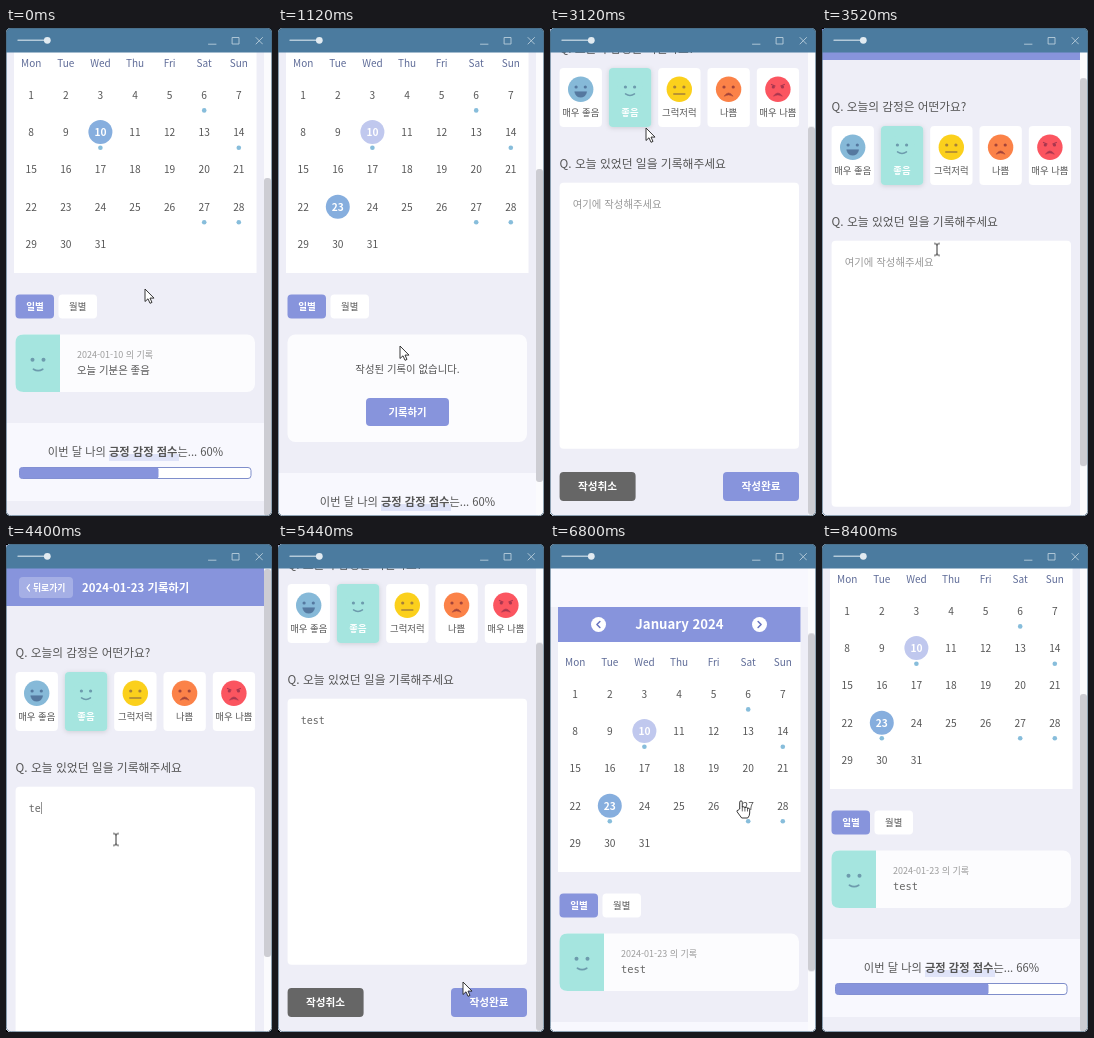
An HTML page that plays this animation: 266 px wide and 488 px high, repeating every 8800 ms.

```html
<!DOCTYPE html>
<html lang="ko">
<head>
<meta charset="utf-8">
<title>Mood diary</title>
<style>
html, body { margin: 0; width: 100%; height: 100%; overflow: hidden; background: #101820; }
svg { display: block; width: 266px; height: 488px; }
text { font-family: "Noto Sans CJK KR", "Noto Sans CJK", sans-serif; fill: #555; white-space: pre; }
.mid { text-anchor: middle; }
.medium { font-weight: 500; }
.bold { font-weight: 700; }
.white { fill: #fff; }
.mono { font-family: "DejaVu Sans Mono", monospace; fill: #666; }
.accent { fill: #8794dc; }
.light { fill: #f8f8fe; }
.soft { fill: #fcfcfe; }
.thumb { fill: #cdcdd3; }
.line { fill: none; stroke-linecap: round; stroke-linejoin: round; }
.pick { filter: drop-shadow(0 1px 2.5px #0002); }
</style>
</head>
<body>
<svg id="stage" viewBox="0 0 266 488"></svg>
<script>
const LOOP = 8800, A_MAX = 171;
let css = '';

// Each step is [ms, value]; values hold until the next step.
function track(id, prop, steps) {
  const frames = steps.map(([ms, v]) => `${ms / LOOP * 100}%{${prop}:${v}}`).join('');
  css += `@keyframes ${id}{${frames}}#${id}{animation:${id} ${LOOP}ms step-end infinite}`;
}
const move = (id, steps) =>
  track(id, 'transform', steps.map(([ms, x, y]) => [ms, `translate(${x}px,${y}px)`]));
const show = (id, from, to = LOOP) => track(id, 'opacity', [
  ...(from ? [[0, 0]] : []), [from, 1], ...(to < LOOP ? [[to, 0]] : [])]);

const rect = (x, y, w, h, r, attrs) =>
  `<rect x="${x}" y="${y}" width="${w}" height="${h}" rx="${r}" ${attrs}/>`;
const dot = (x, y, r, attrs = '') => `<circle cx="${x}" cy="${y}" r="${r}" ${attrs}/>`;
const text = (x, y, size, str, cls = '', attrs = '') =>
  `<text x="${x}" y="${y}" font-size="${size}" class="${cls}" ${attrs}>${str}</text>`;
const path = (d, attrs) => `<path d="${d}" ${attrs}/>`;
const group = (id, body) => `<g id="${id}">${body}</g>`;

// Calendar page, laid out as seen when scrolled to its end
const dayPos = d => [25.2 + (d - 1) % 7 * 34.6, 66.8 + Math.floor((d - 1) / 7) * 37.3];
const dayText = (d, cls) => {
  const [x, y] = dayPos(d);
  return text(x, y + 3.9, 10.2, d, 'mid ' + cls);
};
const mark = d => {
  const [x, y] = dayPos(d);
  return dot(x, y + 15.6, 2.3, 'fill="#87bddb"');
};
const disc = (d, id) => {
  const [x, y] = dayPos(d);
  return dot(x, y, 12, `id="${id}" fill="#86aede"`);
};

function calendar() {
  const days = Array.from({ length: 31 }, (_, i) => dayText(i + 1, '')).join('');
  const names = ['Mon', 'Tue', 'Wed', 'Thu', 'Fri', 'Sat', 'Sun'].map((n, i) =>
    text(25.2 + i * 34.6, 39.3, 10, n, 'mid medium', 'style="fill:#5f6c98"')).join('');
  const arrow = (x, dir) => dot(x, -2.5, 7.5, 'fill="#fff"') +
    path(`M${x - dir * 1.4} -5.5l${dir * 3} 3l${-dir * 3} 3`, 'class="line" stroke="#6874c0" stroke-width="1.5"');
  return rect(0, -150, 258, 130, 0, 'class="light"') +
    rect(8, -20, 242.5, 265, 0, 'fill="#fff"') + rect(8, -20, 242.5, 35, 0, 'class="accent"') +
    arrow(48.5, -1) + arrow(209.5, 1) + text(129.5, 1.7, 13.2, 'January 2024', 'mid white bold') +
    names + days + disc(10, 'today') + dayText(10, 'white bold') +
    group('chosen', disc(23, 'd23') + dayText(23, 'white bold')) +
    [6, 10, 14, 27, 28].map(mark).join('') + group('newMark', mark(23));
}

const record = (id, date, body) => group(id,
  rect(9.5, 306.5, 239.5, 57.5, 8, 'class="soft"') +
  path('M54 306.5H17.5q-8 0-8 8V356q0 8 8 8H54z', 'fill="#a5e5df"') +
  `<g fill="#6d9bad">${dot(26.5, 331.7, 2)}${dot(37.5, 331.7, 2)}</g>` +
  path('M27.5 341.2q4.6 3 9.2 0', 'class="line" stroke="#6d9bad" stroke-width="1.8"') +
  text(71, 330.3, 9, date + ' 의 기록', '', 'style="fill:#9c9c9c"') + body);

const empty = () => group('empty',
  rect(9.5, 306.5, 239.5, 107.5, 8, 'class="soft"') +
  text(129.5, 345, 10.4, '작성된 기록이 없습니다.', 'mid') +
  rect(88, 370, 83, 28, 4, 'class="accent"') + text(129.5, 388, 10.4, '기록하기', 'mid bold white'));

const summary = () => {
  const label = (id, pct) => group(id, text(129.5, 427.7, 11.25,
    `이번 달 나의 <tspan class="bold">긍정 감정 점수</tspan>는... ${pct}%`, 'mid'));
  return group('summary', rect(0, 395, 258, 78, 0, 'class="light"') +
    rect(103, 426, 70, 7, 0, 'fill="#dfe3f8"') + label('before', 60) + label('after', 66) +
    rect(13.5, 439.5, 231.5, 11, 3, 'fill="#fff" stroke="#7f8ecb"') +
    rect(13.5, 439.5, 139, 11, 2, 'id="bar" class="accent"'));
};

const tabs = () => rect(9.5, 266.5, 38.5, 24, 4, 'class="accent"') + text(29, 282.1, 9.6, '일별', 'mid bold white') +
  rect(52.5, 266.5, 38.5, 24, 4, 'fill="#fff"') + text(71.7, 282.1, 9.4, '월별', 'mid');

const pageA = () => group('pageA', rect(0, -150, 258, 700, 0, 'fill="#eeeef7"') + calendar() + tabs() +
  record('rec10', '2024-01-10', text(71, 346, 10.4, '오늘 기분은 좋음')) +
  record('rec23', '2024-01-23', text(71, 345.7, 10.4, 'test', 'mono')) + empty() + summary());

// Writing page, laid out unscrolled: label, skin, ink, mouth, filled mouth
const moods = [
  ['매우 좋음', '#86b9d8', '#55789f', 'M-6 2.5H6Q5 8 0 8T-6 2.5z', true],
  ['좋음', '#a5e5df', '#6d9bad', 'M-4.5 4.7q4.5 3.2 9 0'],
  ['그럭저럭', '#fbd01c', '#a5803a', 'M-5.5 4.8h11'],
  ['나쁨', '#fb8248', '#a3443a', 'M-4.5 7q4.5-6.6 9 0-4.5-2.6-9 0z', true],
  ['매우 나쁨', '#fb5560', '#a8374f', 'M-4.5 7q4.5-6.6 9 0-4.5-2.6-9 0z', true]
];
function moodCard(i, picked) {
  const [label, skin, ink, mouth, solid] = moods[i], x = 9.6 + i * 49.3, mid = x + 21.1;
  const brows = i === 4 ? path('M-6.5-4.8l3.6 1.6M6.5-4.8l-3.6 1.6', 'class="line" stroke-width="1.1"') : '';
  return rect(x, 128, 42.3, 59, 4, `fill="${picked ? skin : '#fff'}" ${picked ? 'class="pick"' : ''}`) +
    `<g transform="translate(${mid} 149.2)">${dot(0, 0, 12.7, `fill="${skin}"`)}<g fill="${ink}" stroke="${ink}">` +
    dot(-4.6, -2.2, 1.6, 'stroke="none"') + dot(4.6, -2.2, 1.6, 'stroke="none"') + brows +
    path(mouth, solid ? 'stroke-width=".5"' : 'class="line" stroke-width="1.5"') + '</g></g>' +
    text(mid, 176, 9.4, label, 'mid' + (picked ? ' bold white' : ''));
}
const caret = x => rect(x, 258, .7, 12, 0, 'fill="#666"');
const typed = (id, str, end) => group(id, text(22.7, 267.7, 10, str, 'mono') + (end ? caret(end) : ''));
const button = (x, cls, label) => rect(x, 532, 76, 29, 4, cls) + text(x + 38, 550.3, 10.6, label, 'mid bold white');

const pageB = () => group('pageB', rect(0, 0, 258, 620, 0, 'fill="#eeeef7"') +
  rect(0, 20, 258, 42, 0, 'class="accent"') + rect(13, 33, 54, 21, 4, 'fill="#fff" fill-opacity=".25"') +
  path('M23.5 40.7l-2.5 3.2 2.5 3.2', 'class="line" stroke="#fff" stroke-width="1.1"') +
  text(27, 46.8, 8.8, '뒤로가기', 'bold white') + text(76, 48, 11.4, '2024-01-23 기록하기', 'bold white') +
  text(9.6, 113, 11.7, 'Q. 오늘의 감정은 어떤가요?') + moods.map((_, i) => moodCard(i)).join('') +
  group('soso', moodCard(2, true)) + group('good', moodCard(1, true)) +
  text(9.6, 228, 11.8, 'Q. 오늘 있었던 일을 기록해주세요') + rect(9.6, 242.8, 239.4, 266, 4, 'fill="#fff"') +
  group('hint', text(22.7, 268, 10.4, '여기에 작성해주세요', '', 'style="fill:#999"')) +
  group('focus', caret(23)) + typed('typed2', 'te', 35.3) + typed('typed3', 'tes', 41.3) + typed('typed4', 'test') +
  button(9.6, 'fill="#666"', '작성취소') + button(173, 'class="accent"', '작성완료'));

// Window parts
const titleBar = () => rect(0, 0, 266, 24.5, 0, 'fill="#4b7b9f"') +
  path('M12 12.3H40', 'class="line" stroke="#b4cad9" stroke-width="1.4"') + dot(41.3, 12.3, 3.4, 'fill="#e2ebf1"') +
  group('controls', path('M202.5 16.2h7.5M226.5 9.5h6.5v6.5h-6.5zM250 9.5l6.5 6.5M256.5 9.5l-6.5 6.5',
    'class="line" stroke="#b9cedc" stroke-width=".9"'));

const scrollBar = () => rect(258, 24, 8, 464, 0, 'fill="#fbfbfd"') +
  [['thumbA', 338], ['thumbTall', 313], ['thumbB', 388]].map(([id, h]) =>
    group(id, group(id + 'Y', rect(258, 0, 7, h, 3, 'class="thumb"')))).join('');

const dialog = () => group('dialog', rect(19.5, 136.5, 84, 80, 3, 'fill="#fff" stroke="#b9bcc4" class="pick"') +
  text(27, 164, 8.5, '작성되었습니다.') + rect(20, 189, 83, 27, 0, 'fill="#f0f0f0"') +
  rect(56.5, 194.5, 39, 15, 2, 'fill="#fdfdfd" stroke="#4b7bb5"') + text(76, 205, 8, '확인', 'mid'));

const pointer = () => group('pointer',
  group('arrow', path('M0 0V12.5L3 9.8 5 14.3 7 13.4 5 9.1H9z', 'fill="#fff" stroke="#222" stroke-width=".9"')) +
  group('beam', path('M-2.5-6Q0-6 0-4.5 0-6 2.5-6M0-5V5M-2.5 6Q0 6 0 4.5 0 6 2.5 6', 'class="line" stroke="#333"')) +
  group('hand', path('M-1.3 8V1.2a1.3 1.3 0 0 1 2.6 0V6q2-.8 2.6.5 2-.6 2.6.6 2.2-.4 2.2 1.6V12q0 3-2 5h-6L-3.9 10.8q-.6-1.6 1-1.6z',
    'fill="#fff" stroke="#222" stroke-width=".9"') + path('M1.3 6v4M3.9 6.5v3.6M6.5 7.1v3', 'class="line" stroke="#222" stroke-width=".7"')));

document.getElementById('stage').innerHTML =
  `<clipPath id="frame">${rect(0, 0, 266, 488, 5, '')}</clipPath><g clip-path="url(#frame)">` +
  rect(0, 0, 266, 488, 0, 'fill="#eeeef7"') + pageA() + pageB() + scrollBar() + titleBar() + dialog() + pointer() +
  rect(.25, .25, 265.5, 487.5, 5, 'fill="none" stroke="#4a6a82" stroke-width=".8"') + '</g>';

// Timeline
const PICK = 1040, OPEN = 1600, MOOD = 3040, DONE = 6320;

const scrollA = [[0, 171], [DONE, 88], [6880, 112], [6960, 148], [7040, 171]];
const scrollB = [[0, 88], [3280, 84], [3360, 71], [3440, 51], [3520, 30], [3600, 14], [3680, 4], [3760, 0],
  [4800, 4], [4880, 16], [4960, 35], [5040, 55], [5120, 72], [5200, 83], [5280, 88]];

track('pageA', 'transform', scrollA.map(([ms, s]) => [ms, `translateY(${A_MAX - s}px)`]));
move('thumbAY', scrollA.map(([ms, s]) => [ms, 0, 25 + s * .731]));
move('thumbTallY', [[0, 0, 141]]);
move('thumbBY', scrollB.map(([ms, s]) => [ms, 0, 25 + s * .838]));
css += `@keyframes open{0%{opacity:0}${OPEN / LOOP * 100}%{opacity:1}${DONE / LOOP * 100}%{opacity:0}}`;
move('pageB', scrollB.map(([ms, s]) => [ms, 0, -s]));
css += `#pageB{animation:pageB ${LOOP}ms step-end infinite,open ${LOOP}ms step-end infinite}`;

track('thumbA', 'opacity', [[0, 1], [PICK, 0], [DONE, 1]]);
show('thumbTall', PICK, OPEN);
show('thumbB', OPEN, DONE);

track('today', 'fill', [[0, '#86aede'], [PICK, '#c0c8ee']]);
show('chosen', PICK);
show('newMark', DONE);
show('rec10', 0, PICK);
show('empty', PICK, DONE);
show('rec23', DONE);
move('summary', [[0, 0, 0], [PICK, 0, 50], [DONE, 0, 0]]);
show('before', 0, DONE);
show('after', DONE);
track('bar', 'width', [[0, '139px'], [DONE, '153px']]);

show('soso', 0, MOOD);
show('good', MOOD);
show('hint', 0, 4400);
show('focus', 4080, 4400);
show('typed2', 4400, 4560);
show('typed3', 4560, 4720);
show('typed4', 4720);

show('dialog', 5600, DONE);
track('controls', 'opacity', [[0, 1], [5600, .6], [DONE, 1]]);

const route = [
  [0, 139, 261], [1040, 60, 180, 'hand'], [1120, 122, 318], [1200, 169, 402], [1360, 160, 374],
  [1680, 152, 402], [1760, 140, 436], [1840, 130, 452], [2000, 128, 457],
  [2160, 137, 400, 'beam'], [2240, 130, 318, 'beam'], [2320, 125, 266, 'beam'], [2480, 125, 240, 'beam'],
  [2720, 94, 85, 'hand'], [2880, 92, 84, 'hand'], [3120, 96, 100], [3200, 104, 140], [3280, 110, 185, 'beam'],
  [3360, 114, 210, 'beam'], [3440, 115, 220, 'beam'], [3520, 115, 221.5, 'beam'], [3600, 114, 240, 'beam'],
  [3680, 113, 264, 'beam'], [3760, 112, 286, 'beam'], [3920, 112, 290, 'beam'], [4080, 112, 296, 'beam'],
  [4400, 110, 295.5, 'beam'], [4960, 120, 312, 'beam'], [5040, 142, 350, 'beam'], [5120, 166, 395, 'beam'],
  [5200, 185, 430], [5280, 193, 447], [5440, 185, 438], [5680, 150, 350], [5760, 102, 256], [5840, 73, 209],
  [6000, 62, 191], [6400, 90, 208], [6480, 134, 235], [6560, 172, 256], [6720, 191, 257, 'hand'],
  [6960, 186, 274], [7040, 181, 286], [7360, 198, 408], [7680, 202, 454], [7920, 176, 453], [8400, 176, 453, 'none']
];
move('pointer', route);
for (const kind of ['arrow', 'beam', 'hand'])
  track(kind, 'opacity', route.map(([ms, , , k = 'arrow']) => [ms, +(k === kind)]));

document.head.appendChild(document.createElement('style')).textContent = css;
</script>
</body>
</html>
```
